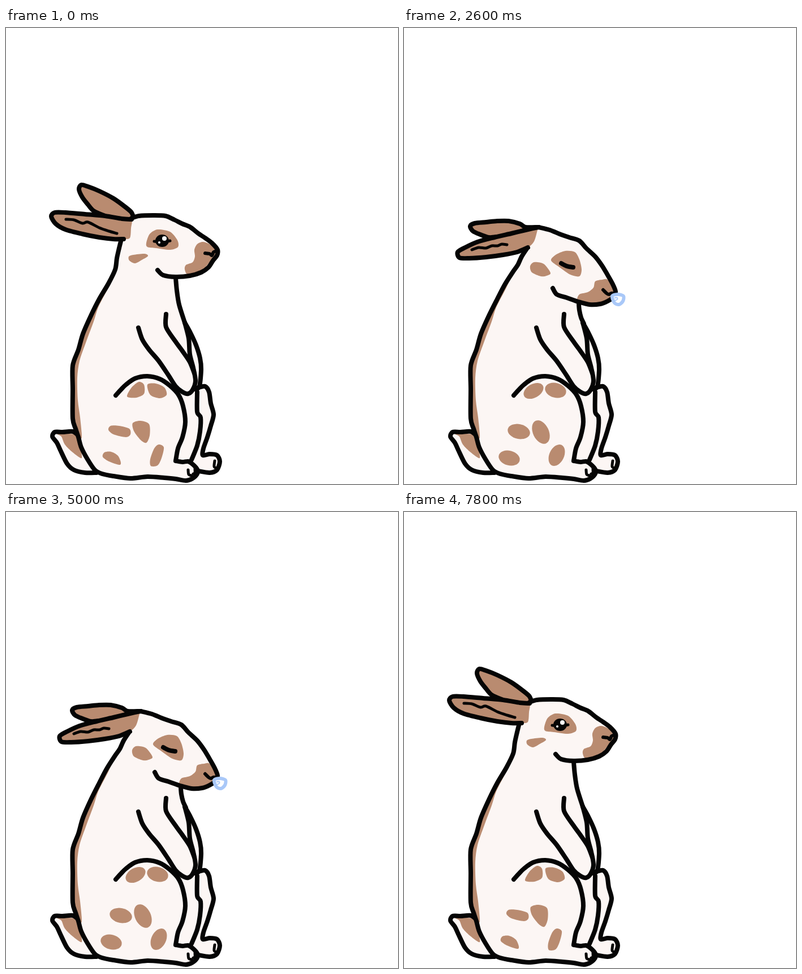
An HTML page with a canvas that plays this animation: 693 px wide and 808 px high, repeating every 8000 ms.

```html
<!DOCTYPE html>
<html lang="en">
<head>
<meta charset="utf-8">
<title>Sleepy rabbit</title>
<style>
  html, body { margin: 0; width: 100%; height: 100%; overflow: hidden; background: #fff; }
  canvas { display: block; }
</style>
</head>
<body>
<canvas id="stage" width="693" height="808"></canvas>
<script>
const ctx = document.getElementById('stage').getContext('2d');
const INK = '#050505', FUR = '#fcf6f4', BROWN = '#b98b70', BLUE = '#a9c8f8';

const points = text => {
  const n = text.split(' ').map(Number);
  return Array.from({ length: n.length / 2 }, (_, i) => [n[2 * i], n[2 * i + 1]]);
};

// Each moving part has three matching outlines: awake, asleep, breathing in.
const parts = {
  head: [
    '222 337 235 333 260 332 282 333 298 340 312 347 326 353 340 364 352 372 364 381 374 393 373 403 366 412 358 424 345 433 325 439 300 441 278 438 268 429',
    '250 354 268 360 285 370 303 377 320 385 330 398 345 411 355 428 362 445 370 460 377 476 374 486 364 493 350 498 330 499 310 494 290 486 273 478 266 464',
    '238 353 258 358 275 365 292 371 310 377 322 390 338 405 350 421 359 436 368 452 374 467 370 477 360 484 347 489 328 490 308 485 288 478 270 472 263 461'],
  nearEar: [
    '222 339 205 338 175 333 140 330 105 327 86 327 80 334 88 347 105 357 135 365 165 371 190 374 208 374',
    '250 354 225 357 200 364 170 371 140 378 115 392 102 402 103 412 118 415 150 412 180 406 205 398 222 391',
    '238 353 215 358 190 364 160 371 130 379 108 389 95 397 98 407 115 408 145 406 175 402 200 397 219 389'],
  earBase: ['219 372 221 355', '238 382 247 362', '230 378 236 358'],
  earFold: [
    '106 339 120 340 135 346 145 344 165 354 182 360 196 364',
    '127 401 140 396 155 392 165 388 180 388 192 385 204 384',
    '120 393 132 389 145 390 155 386 165 386 173 383 182 384'],
  farEar: [
    '226 338 222 327 212 318 190 302 165 289 145 281 133 278 129 286 135 300 145 313 155 324 175 333',
    '252 354 235 353 215 348 190 345 172 345 150 349 128 351 120 357 128 367 143 375 158 374 180 368',
    '236 353 215 353 205 347 185 342 165 342 145 344 125 346 117 351 122 360 135 366 150 371 165 370'],
  eyePatch: [
    '248 381 254 365 268 357 290 361 303 376 304 388 290 393 265 390 250 388',
    '267 417 272 407 290 399 308 400 318 417 319 437 310 445 295 440 278 425',
    '260 412 268 402 285 395 302 397 310 410 314 428 310 440 294 437 275 424'],
  cheek: [
    '217 405 225 402 245 400 251 404 240 411 228 417 218 412',
    '231 427 236 420 255 423 268 436 260 444 248 444 233 438',
    '223 422 230 415 247 418 259 434 252 439 242 440 226 433'],
  muzzle: [
    '372 393 360 383 348 379 338 383 333 393 334 405 330 415 318 420 316 428 322 437 345 431 360 415 371 403',
    '377 478 369 458 356 453 342 457 341 468 330 476 315 479 307 485 312 494 330 497 350 497 363 491 374 486',
    '372 466 360 446 350 446 338 449 335 460 325 468 310 472 306 482 312 486 330 489 347 488 360 482 368 477'],
  nose: [
    '352 399 360 400 364 403 367 397 372 395',
    '356 474 360 479 364 482 370 480 374 480',
    '352 464 358 470 362 472 367 470 372 470'],
  eyelid: ['266 377 276 378 287 378', '286 420 297 428 306 429', '278 417 288 422 299 424'],
  nape: [
    '203 378 200 390 196 408 193 428 181 453',
    '223 393 212 408 198 424 186 440 178 455',
    '217 391 208 405 201 420 192 433 178 455'],
  chest: [
    '300 443 302 465 306 490 316 522',
    '309 499 311 505 314 512 318 524',
    '309 489 310 500 313 513 318 524']
};
for (const name in parts) parts[name] = parts[name].map(points);

const back = points('165 480 150 510 136 542 128 570 118 598 118 640 118 692 123 710 128 725 133 743 144 764 157 783 170 790 190 794 220 798 250 795 280 797 300 799 318 802 330 798 338 790 338 782 330 773 322 768 312 769 300 767');
const haunch = points('300 767 304 745 312 725 317 698 313 670 305 650 290 634 272 622 250 617 228 621 212 632 203 641 194 651');
const shin = points('338 645 338 680 344 690 343 715 338 740 328 765');
const farLeg = points('340 637 352 635 359 645 362 665 367 685 362 705 356 725 349 745 348 757 360 755 373 757 378 768 373 783 360 788 340 785');
const nearArm = points('234 531 241 552 253 570 270 590 287 615 300 635 312 645 322 648 330 641 335 625 331 602 325 578 323 550 316 522');
const armFront = points('283 507 283 530 300 556 313 574 325 592 333 612');
const farArm = points('316 522 326 540 336 562 343 585 345 605 342 635 335 640');
const tail = points('128 722 118 715 100 716 86 716 82 724 90 735 97 750 108 772 120 783 140 788 160 788');
const tailPatch = points('91 719 125 721 130 738 134 762 118 752 104 738 98 724');
const stripeEdge = points('134 725 131 690 127 660 126 620 130 590 142 555 155 520 163 495 180 462 190 440');
const toes = ['322 783 323 791 328 793', '334 781 334 788 331 790', '369 767 368 777 372 780'].map(points);

const awakeSpots = [
  '214 653 222 637 235 627 244 632 244 648 230 655',
  '250 632 265 630 280 637 284 650 272 656 255 650',
  '181 712 185 705 200 705 218 710 220 720 212 725 190 720',
  '224 700 238 696 253 702 254 722 248 735 238 730 226 714',
  '171 760 174 752 186 751 198 758 203 770 200 774 182 768',
  '262 745 270 738 279 743 275 762 268 775 256 776 255 764'].map(points);
// x, y, rx, ry, degrees
const roundSpots = [
  [229, 643, 19, 12, -30], [268, 642, 19, 13, 15], [203, 715, 20, 13, 12],
  [242, 716, 14, 22, -25], [186, 762, 19, 13, 15], [270, 757, 13, 20, 25]];

const mix = (a, b, t) => a + (b - a) * t;

function trace(p, closed) {
  const n = p.length;
  const at = i => closed ? p[(i + n) % n] : p[Math.max(0, Math.min(n - 1, i))];
  ctx.beginPath();
  ctx.moveTo(...p[0]);
  for (let i = 0; i < (closed ? n : n - 1); i++) {
    const [a, b, c, d] = [at(i - 1), at(i), at(i + 1), at(i + 2)];
    ctx.bezierCurveTo(b[0] + (c[0] - a[0]) / 7, b[1] + (c[1] - a[1]) / 7,
      c[0] - (d[0] - b[0]) / 7, c[1] - (d[1] - b[1]) / 7, c[0], c[1]);
  }
}
function fill(p, color) { trace(p, true); ctx.fillStyle = color; ctx.fill(); }
function line(p, width = 8, color = INK) {
  trace(p, false);
  ctx.lineWidth = width;
  ctx.strokeStyle = color;
  ctx.stroke();
}
function oval(x, y, rx, ry, color, degrees = 0) {
  ctx.beginPath();
  ctx.ellipse(x, y, rx, ry, degrees * Math.PI / 180, 0, 7);
  ctx.fillStyle = color;
  ctx.fill();
}

// nod: 0 awake .. 1 asleep; earReach: how far the ear tips swing left
function poseAt(ms) {
  if (ms >= 1800 && ms < 6600) {
    return Math.floor((ms - 1800) / 400) % 2
      ? { nod: 1, bubble: [384, 492, 1.45] }
      : { nod: 1, inhale: true, bubble: [378, 481, 1] };
  }
  const starts = ms < 1800 ? [1400, 1000, 600, 400, 200] : [7000, 7200, 7400, 7600, 7800];
  const step = ms < 1800
    ? starts.filter(s => ms >= s).length
    : 5 - starts.filter(s => ms >= s).length;
  return [
    { nod: 0 }, { nod: .12, earReach: 15 }, { nod: .26, earReach: 14 },
    { nod: .56, earReach: 20 }, { nod: .82, earReach: 16 }, { nod: 1 }][step];
}

function shape(pose) {
  const result = {};
  for (const name in parts) {
    const [awake, asleep, inhale] = parts[name];
    const reach = /ear(?!t)/i.test(name) ? pose.earReach || 0 : 0;
    result[name] = pose.inhale ? inhale : awake.map((p, i) => {
      const x = mix(p[0], asleep[i][0], pose.nod);
      return [x - reach * Math.max(0, (222 - x) / 140), mix(p[1], asleep[i][1], pose.nod)];
    });
  }
  return result;
}

function drawBody(s, awake) {
  fill(tail, FUR);
  fill(tailPatch, BROWN);
  line(tail);
  fill(farLeg.concat([[330, 765], [330, 645]]), FUR);
  fill(farArm.concat([[322, 600]]), FUR);
  const spine = s.nape.concat(back);
  fill(spine.concat([[328, 765], [338, 740], [343, 715], [344, 690], [338, 645], [335, 620], [324, 560]],
    s.chest.slice().reverse()), FUR);
  fill(s.nape.slice(3).concat(back.slice(0, 9), stripeEdge), BROWN);
  if (awake) awakeSpots.forEach(p => fill(p, BROWN));
  else roundSpots.forEach(([x, y, rx, ry, turn]) => oval(x, y, rx, ry, BROWN, turn));
  [farLeg, shin, farArm, nearArm, armFront, haunch, s.chest].forEach(p => line(p));
  toes.forEach(p => line(p, 5));
  return spine;
}

function drawEye(s, nod) {
  const open = 1 - nod * 1.2;
  if (open < .1) return line(s.eyelid, 8);
  ctx.save();
  ctx.translate(mix(276, 296, nod), mix(377, 425, nod));
  ctx.rotate(nod * .4);
  ctx.scale(1, open);
  oval(0, 0, 12, 11, INK);
  line([[-14, 1], [0, 2], [14, 0]], 5);
  oval(4, -4, 4, 4, '#fff');
  oval(-5, 3, 2, 2, '#fff');
  ctx.restore();
}

function drawBubble([x, y, size]) {
  ctx.save();
  ctx.translate(x, y);
  ctx.scale(size, size);
  const rim = [[-10, -6], [0, -9], [10, -6], [9, 3], [2, 9], [-6, 6]];
  fill(rim, '#fff');
  trace(rim, true);
  ctx.lineWidth = 6;
  ctx.strokeStyle = BLUE;
  ctx.stroke();
  line([[-5, -3], [-1, -3], [-1, 0], [-5, 2]], 2, BLUE);
  ctx.restore();
}

function draw(ms) {
  const pose = poseAt(ms), s = shape(pose);
  ctx.fillStyle = '#fff';
  ctx.fillRect(0, 0, 693, 808);
  ctx.lineCap = ctx.lineJoin = 'round';

  const spine = drawBody(s, pose.nod === 0);
  fill(s.farEar, BROWN);
  line(s.farEar);
  fill(s.head.concat([s.nape[0]]), FUR);
  line(spine);
  fill(s.nearEar.concat(s.earBase), BROWN);
  line(s.nearEar);
  line(s.earFold, 5);
  fill(s.eyePatch, BROWN);
  fill(s.cheek, BROWN);
  fill(s.muzzle, BROWN);
  line(s.head);
  line(s.nose, 6);
  drawEye(s, pose.nod);
  if (pose.bubble) drawBubble(pose.bubble);
}

const start = performance.now();
function frame() {
  draw((performance.now() - start) % 8000);
  requestAnimationFrame(frame);
}
frame();
</script>
</body>
</html>
```
